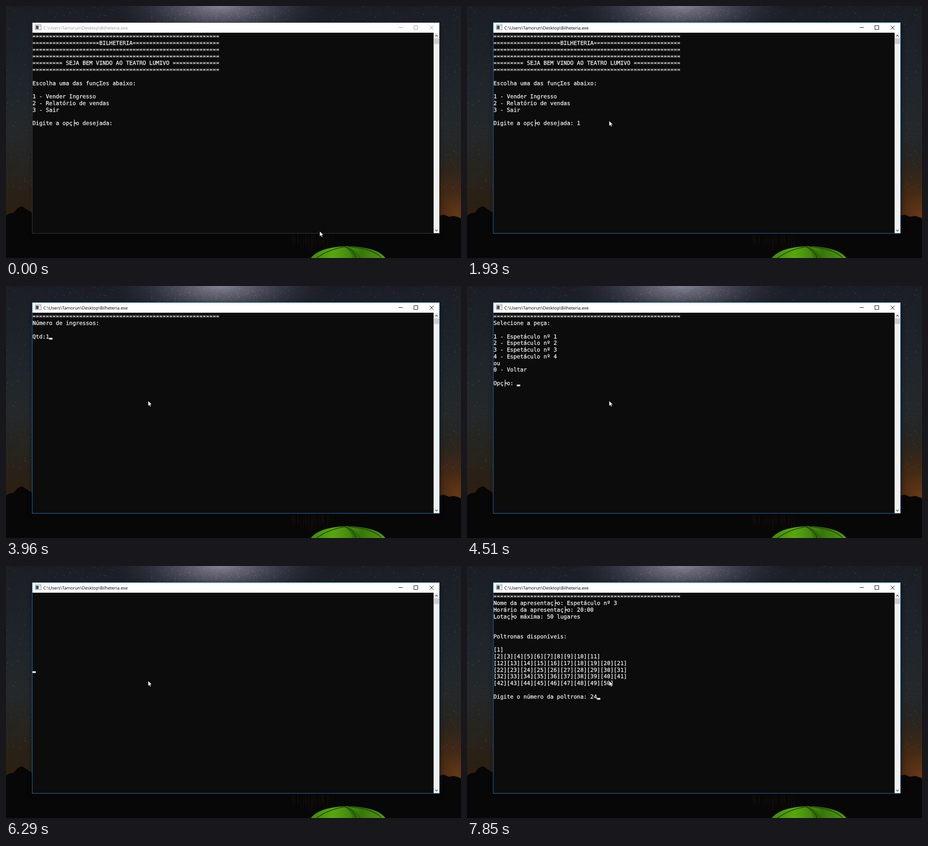
These frames come from a looping animation (1005 px wide and 557 px high, 8000 ms). An HTML page:

```html
<!DOCTYPE html>
<html lang="pt">
<head>
<meta charset="utf-8">
<title>Bilheteria</title>
<style>
  :root { --cw: 7.375px; --ch: 14.75px; }
  html, body { margin: 0; width: 100%; height: 100%; overflow: hidden; background: #060606; }
  svg { display: block; width: 1005px; height: 557px; }
  text { white-space: pre; text-rendering: geometricPrecision; }
  .row { font: 12.25px "DejaVu Sans Mono", monospace; fill: #f2f2f2; stroke: #f2f2f2; stroke-width: .3; }
  .star { fill: none; stroke: #e8e8e8; stroke-width: 1; }
  .title { font: 9.6px "Open Sans", "Noto Sans", sans-serif; fill: currentColor; }
  .line { fill: none; stroke: currentColor; }

  .anim { animation: 8s step-end infinite; }
  #win { animation-name: focus; }
  #edge { animation-name: edge; }
  #shadow { animation-name: shadow; filter: blur(5px); }
  #mouse { animation-name: mouse; }
  #click { animation-name: click; }
  #caret { animation-name: caret; }
  #rule { animation-name: rule; }
  #menu { animation-name: menu; }
  #menuKey { animation-name: menuKey; }
  #amount { animation-name: amount; }
  #amountKey { animation-name: amountKey; }
  #plays { animation-name: plays; }
  #playsKey { animation-name: playsKey; }
  #seats { animation-name: seats; }
  #seatsKey1 { animation-name: seatsKey1; }
  #seatsKey2 { animation-name: seatsKey2; }

  @keyframes focus { 0% { color: #999 } 11.25%, 100% { color: #000 } }
  @keyframes edge { 0% { stroke: #3b3b3b } 11.25%, 100% { stroke: #1a78c4 } }
  @keyframes shadow { 0% { opacity: .2 } 11.25%, 100% { opacity: .35 } }
  @keyframes click { 0% { opacity: 0 } 11.25% { opacity: 1 } 13.125%, 100% { opacity: 0 } }
  @keyframes mouse {
    0% { transform: translate(693px, 498px) }
    .875% { transform: translate(610px, 465px) }
    1.625% { transform: translate(450px, 402px) }
    2.375% { transform: translate(368px, 370px) }
    6.125% { transform: translate(358px, 346px) }
    7.125% { transform: translate(336px, 300px) }
    8.125% { transform: translate(319px, 264px) }
    9.125%, 100% { transform: translate(314px, 254px) }
  }

  @keyframes rule {
    0% { opacity: 1 } 35.75% { opacity: 0 } 36.75% { opacity: 1 }
    78.625% { opacity: 0 } 79.625%, 100% { opacity: 1 }
  }
  @keyframes menu { 0% { opacity: 1 } 35.75%, 100% { opacity: 0 } }
  @keyframes menuKey { 0% { opacity: 0 } 22% { opacity: 1 } 35.75%, 100% { opacity: 0 } }
  @keyframes amount { 0% { opacity: 0 } 36.75% { opacity: 1 } 55.375%, 100% { opacity: 0 } }
  @keyframes amountKey { 0% { opacity: 0 } 49.5% { opacity: 1 } 55.375%, 100% { opacity: 0 } }
  @keyframes plays { 0% { opacity: 0 } 56.375% { opacity: 1 } 78.625%, 100% { opacity: 0 } }
  @keyframes playsKey { 0% { opacity: 0 } 74.75% { opacity: 1 } 78.625%, 100% { opacity: 0 } }
  @keyframes seats { 0% { opacity: 0 } 79.625%, 100% { opacity: 1 } }
  @keyframes seatsKey1 { 0% { opacity: 0 } 95.25%, 100% { opacity: 1 } }
  @keyframes seatsKey2 { 0% { opacity: 0 } 98.125%, 100% { opacity: 1 } }

  /* column and row of the text caret, with its blinking */
  @keyframes caret {
    0% { --c: 25; --r: 13; opacity: 0 }
    18.25% { --c: 25; --r: 13; opacity: 1 }
    22% { --c: 26; --r: 13; opacity: 1 }
    24.125% { --c: 26; --r: 13; opacity: 0 }
    30.875% { --c: 26; --r: 13; opacity: 1 }
    33.75% { --c: 0; --r: 14; opacity: 1 }
    36.75% { --c: 4; --r: 3; opacity: 1 }
    44.5% { --c: 4; --r: 3; opacity: 0 }
    49.5% { --c: 5; --r: 3; opacity: 1 }
    51.375% { --c: 5; --r: 3; opacity: 0 }
    53.5% { --c: 0; --r: 4; opacity: 1 }
    56.375% { --c: 7; --r: 10; opacity: 1 }
    64% { --c: 7; --r: 10; opacity: 0 }
    70.875% { --c: 7; --r: 10; opacity: 1 }
    74.75% { --c: 8; --r: 10; opacity: 1 }
    77.75% { --c: 0; --r: 11; opacity: 1 }
    79.625% { --c: 29; --r: 15; opacity: 1 }
    90.375% { --c: 29; --r: 15; opacity: 0 }
    95.25% { --c: 30; --r: 15; opacity: 1 }
    97.25% { --c: 30; --r: 15; opacity: 0 }
    98.125%, 100% { --c: 31; --r: 15; opacity: 1 }
  }
  @property --c { syntax: "<number>"; inherits: false; initial-value: 0; }
  @property --r { syntax: "<number>"; inherits: false; initial-value: 0; }
  #caret { transform: translate(calc(var(--c) * var(--cw)), calc(var(--r) * var(--ch))); }
</style>
</head>
<body>
<svg viewBox="0 0 1005 557">
  <defs>
    <linearGradient id="sky" x2="0" y2="1">
      <stop offset="0" stop-color="#1b1e25"/>
      <stop offset=".3" stop-color="#1f252b"/>
      <stop offset=".5" stop-color="#24282a"/>
      <stop offset=".65" stop-color="#26241f"/>
      <stop offset=".78" stop-color="#2b2014"/>
      <stop offset=".85" stop-color="#2f2010"/>
    </linearGradient>
    <radialGradient id="glow">
      <stop offset="0" stop-color="#a4a1b4" stop-opacity=".8"/>
      <stop offset=".35" stop-color="#777588" stop-opacity=".6"/>
      <stop offset=".7" stop-color="#44465a" stop-opacity=".35"/>
      <stop offset="1" stop-color="#2a2c38" stop-opacity="0"/>
    </radialGradient>
    <radialGradient id="dusk">
      <stop offset="0" stop-color="#7a4016" stop-opacity=".75"/>
      <stop offset=".4" stop-color="#5a3014" stop-opacity=".5"/>
      <stop offset="1" stop-color="#3a2414" stop-opacity="0"/>
    </radialGradient>
    <linearGradient id="tent">
      <stop offset="0" stop-color="#3f8a0a"/>
      <stop offset=".3" stop-color="#59a60e"/>
      <stop offset=".5" stop-color="#468c0c"/>
      <stop offset=".68" stop-color="#37760a"/>
      <stop offset="1" stop-color="#4f9c0f"/>
    </linearGradient>
  </defs>

  <rect width="1005" height="557" fill="url(#sky)"/>
  <ellipse cx="472" cy="-4" rx="240" ry="95" fill="url(#glow)"/>
  <ellipse cx="1000" cy="460" rx="130" ry="140" fill="url(#dusk)"/>
  <g id="sparks" fill="#c8c8d0"></g>
  <path fill="#070707" d="M0 463 L9 458 L17 457 L25 447 L35 442 L45 449 L58 457 L200 480 H900 L957 464
    L967 461 L978 466 L990 464 L1005 469 V557 H0Z"/>
  <path id="trees" fill="none" stroke="#170f0b"/>
  <g>
    <path fill="url(#tent)" d="M673 557 Q688 540 716 535 Q748 528 782 533 Q824 538 838 557Z"/>
    <path fill="#2a6007" opacity=".6" d="M754 532 Q774 539 785 557 H765 Q764 543 748 532Z"/>
    <path fill="none" stroke="#1b3f06" stroke-width="1.5"
      d="M686 557 Q714 537 750 532 M748 532 Q770 541 773 557 M756 532 Q808 535 829 556"/>
  </g>

  <rect id="shadow" class="anim" x="56" y="39" width="904" height="468" fill="#000"/>
  <g id="win" class="anim">
    <rect x="58" y="37" width="899" height="465.5" fill="#0c0c0c"/>
    <rect x="58" y="37" width="899" height="22" fill="#fff"/>
    <rect x="64.5" y="41.5" width="13" height="11" fill="#f4f4f4" stroke="#8d9094"/>
    <rect x="66" y="43.5" width="6" height="7.5" fill="#454c57"/>
    <path d="M73.5 44.5h2.5" stroke="#777"/>
    <text class="title" x="82.6" y="51.6">C:\Users\Tamorun\Desktop\Bilheteria.exe</text>
    <path class="line" d="M867.5 47.5h9 M901 43.5h8.5v8.5h-8.5z M935.5 43.5l9 9 M944.5 43.5l-9 9"/>
    <rect x="944.5" y="59" width="12.5" height="443" fill="#f0f0f0"/>
    <rect x="945.5" y="71.5" width="11" height="12.5" fill="#cdcdcd"/>
    <path d="M948 67.3l2.7-2.7 2.7 2.7 M948 494.7l2.7 2.7 2.7-2.7" fill="none" stroke="#505050" stroke-width="1.4"/>
  </g>
  <rect id="edge" class="anim" x="58" y="36.5" width="899.5" height="466" fill="none"/>
  <g id="screen"></g>
  <rect id="caret" class="anim" x="58.4" y="70.5" width="7.4" height="3.6" fill="#fff"/>
  <path id="mouse" class="anim" d="M0 0V11.2L2.6 8.8 4.3 12.7 6.1 12 4.5 8.1H8Z" fill="#fff" stroke="#000" stroke-width=".5"/>
  <circle id="click" class="anim" cx="313" cy="253" r="11" fill="#f4ea10" fill-opacity=".5"/>
</svg>
<script>
  const CW = 7.375, CH = 14.75, LEFT = 58.4, TOP = 59.2;
  const $ = id => document.getElementById(id);

  function add(parent, tag, attrs, text = '') {
    const el = document.createElementNS('http://www.w3.org/2000/svg', tag);
    for (const k in attrs) el.setAttribute(k, attrs[k]);
    el.textContent = text;
    return parent.appendChild(el);
  }

  // One line on the character grid; asterisks are wide and sit mid-cell.
  function print(parent, line, row, col = 0) {
    const y = TOP + row * CH;
    const xs = [...line].map((_, i) => +(LEFT + (col + i) * CW).toFixed(2));
    const stars = xs.filter((_, i) => line[i] === '*')
      .map(x => `M${x + .3} ${y + 8}h6.6M${x + 1.2} ${y + 5.3}l4.8 5.4m0-5.4l-4.8 5.4`);
    if (stars.length) add(parent, 'path', { class: 'star', d: stars.join('') });
    const text = line.replace(/\*/g, ' ');
    if (text.trim()) add(parent, 'text', { class: 'row', x: xs.join(' '), y: y + 12.1 }, text);
  }

  function page(id, lines, row = 0, col = 0) {
    const g = add($('screen'), 'g', { id, class: 'anim' });
    lines.forEach((line, i) => print(g, line, row + i, col));
  }

  const stars = n => '*'.repeat(n);
  const seats = (a, b) => {
    let s = '';
    for (let n = a; n <= b; n++) s += `[${n}]`;
    return s;
  };

  page('rule', [stars(56)]);
  page('menu', [
    stars(20) + 'BILHETERIA' + stars(26),
    stars(56),
    stars(56),
    stars(9) + ' SEJA BEM VINDO AO TEATRO LUMIVO ' + stars(14),
    stars(56),
    '',
    'Escolha uma das funçΣes abaixo:',
    '',
    '1 - Vender Ingresso',
    '2 - Relatório de vendas',
    '3 - Sair',
    '',
    'Digite a opç╞o desejada:'
  ], 1);
  page('menuKey', ['1'], 13, 25);
  page('amount', ['Número de ingressos:', '', 'Qtd:'], 1);
  page('amountKey', ['1'], 3, 4);
  page('plays', [
    'Selecione a peça:',
    '',
    ...[1, 2, 3, 4].map(n => `${n} - Espetáculo nº ${n}`),
    'ou',
    '0 - Voltar',
    '',
    'Opç╞o:'
  ], 1);
  page('playsKey', ['3'], 10, 7);
  page('seats', [
    'Nome da apresentaç╞o: Espetáculo nº 3',
    'Horário da apresentaç╞o: 20:00',
    'Lotaç╞o máxima: 50 lugares',
    '', '',
    'Poltronas disponíveis:',
    '',
    seats(1, 1), seats(2, 11), seats(12, 21), seats(22, 31), seats(32, 41), seats(42, 50),
    '',
    'Digite o número da poltrona:'
  ], 1);
  page('seatsKey1', ['2'], 15, 29);
  page('seatsKey2', ['4'], 15, 30);

  let seed = 11;
  const rnd = () => (seed = seed * 16807 % 2147483647) / 2147483647;

  function spark(x, y, max) {
    const size = .6 + rnd() * .7;
    add($('sparks'), 'rect', { x, y, width: size, height: size, opacity: .1 + rnd() * max });
  }
  for (let i = 0; i < 350; i++) spark(rnd() * 1005, rnd() * 36, .3);
  for (let i = 0; i < 450; i++) spark(472 + (rnd() + rnd() - 1) * 180, rnd() * 36, .4);
  for (let i = 0; i < 160; i++) spark(rnd() * 57, 36 + rnd() * 370, .3);
  for (let i = 0; i < 140; i++) spark(958 + rnd() * 47, 36 + rnd() * 370, .3);

  let trunks = '';
  for (let i = 0; i < 34; i++) trunks += `M${620 + rnd() * 110} 504v${8 + rnd() * 30}`;
  $('trees').setAttribute('d', trunks);
</script>
</body>
</html>
```
